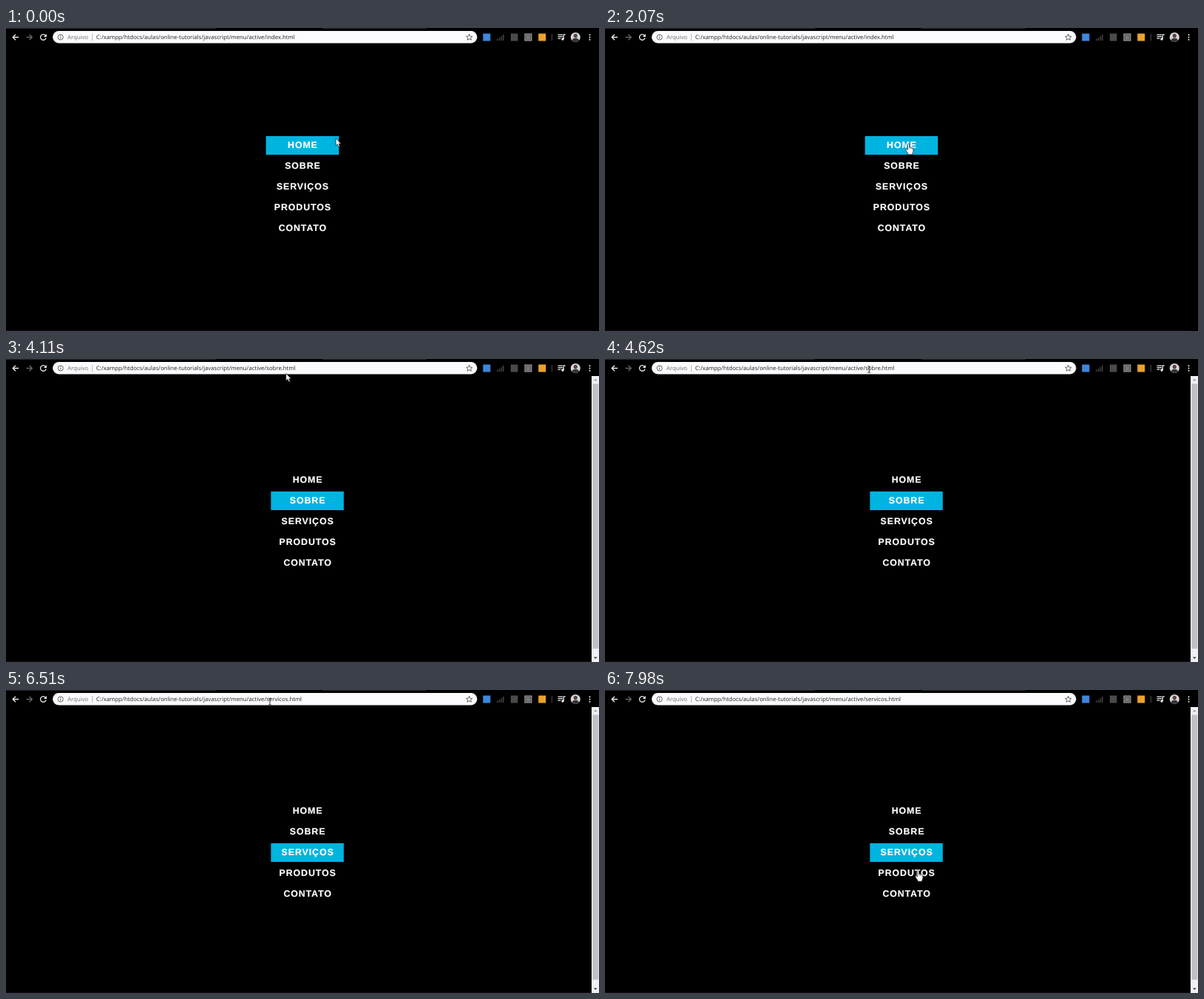
Recreate the animation shown at these times as an HTML page. Size 800 px wide and 409 px high, loop 8000 ms.

```html
<!DOCTYPE html>
<html lang="pt">
<head>
<meta charset="utf-8">
<title>Menu</title>
<style>
  html, body { margin: 0; height: 100%; overflow: hidden; background: #000; }
  svg { display: block; width: 100vw; height: 100vh; }
  text { text-rendering: geometricPrecision; }
  .url { font: 7.75px "Open Sans", "Noto Sans", sans-serif; fill: #202124; }
  .menu text {
    font: bold 12.3px "Liberation Sans", Arial, sans-serif;
    letter-spacing: .95px; text-anchor: middle;
    fill: #fff; stroke: #fff; stroke-width: .2;
  }
  .line { fill: none; stroke: #eee; stroke-width: 1.3; }
  .cursor { fill: #fff; stroke: #222; stroke-width: .7; stroke-linejoin: round; }
</style>
</head>
<body>
<svg viewBox="0 0 800 409" preserveAspectRatio="none">
  <rect width="800" height="409"/>
  <path d="M0 .5H283M427 .5H567" stroke="#29262b"/>
  <path d="M0 408.5H790" stroke="#160916"/>

  <!-- toolbar -->
  <path class="line" d="M17 12.5H9.5M13 8.7 9.2 12.5 13 16.3"/>
  <path class="line" style="stroke:#666" d="M27.5 12.5H35M31.5 8.7 35.3 12.5 31.5 16.3"/>
  <g id="reload">
    <path class="line" d="M53.2 10A3.8 3.8 0 1 0 54 13.3"/>
    <path fill="#eee" d="M54.8 8V12H50.8Z"/>
  </g>
  <path id="stop" class="line" d="M47 9.2 53.6 15.8M53.6 9.2 47 15.8"/>
  <rect x="63" y="4" width="572.6" height="16.4" rx="8.2" fill="#fbfafc"/>
  <g fill="none" stroke="#55585c" stroke-width=".9">
    <circle cx="73.6" cy="12.4" r="3.6"/>
    <path d="M73.6 11.8V14.5M73.6 10.1V11"/>
    <path d="M625 8.3 626.2 11.1 629.2 11.4 626.9 13.3 627.6 16.2 625 14.7 622.4 16.2 623.1 13.3 620.8 11.4 623.8 11.1Z"/>
  </g>
  <text class="url" x="83" y="15" style="fill:#6b6e73">Arquivo</text>
  <path d="M116.4 8V17" stroke="#a5a5aa" stroke-width=".8"/>
  <text class="url" id="url" x="121.7" y="15"></text>

  <rect x="643.5" y="7.5" width="10" height="10" fill="#3f86dc"/>
  <path d="M663 17V14.5M665.7 17V13M668.4 17V11M671 17V8.8" stroke="#3c3c3c" stroke-width="1.7"/>
  <rect x="681" y="7.5" width="9.5" height="10" fill="#4a4a4a"/>
  <rect x="700" y="8" width="9" height="9" fill="#555" stroke="#aaa"/>
  <path d="M702 10.7H707M702 12.6H707M702 14.5H707" stroke="#aaa" stroke-width=".8"/>
  <rect x="718.3" y="7.5" width="10" height="10" fill="#eba32c"/>
  <path d="M736.5 8V17" stroke="#4a4a4a"/>
  <path class="line" d="M744.5 9.2H751M744.5 11.7H751M744.5 14.2H748.3M752.3 15V8.9H754.8"/>
  <circle cx="751" cy="15" r="1.7" fill="#eee"/>
  <clipPath id="round"><circle cx="768.3" cy="12.4" r="6.5"/></clipPath>
  <g clip-path="url(#round)">
    <rect x="761" y="5" width="15" height="15" fill="#d8d5d6"/>
    <circle cx="768.3" cy="10.4" r="2.6" fill="#5a4640"/>
    <ellipse cx="768.3" cy="18" rx="5" ry="4.5" fill="#35343a"/>
  </g>
  <g fill="#eee">
    <circle cx="787.5" cy="9.2" r="1"/><circle cx="787.5" cy="12.5" r="1"/><circle cx="787.5" cy="15.8" r="1"/>
  </g>

  <!-- page -->
  <g class="menu" id="menu"><rect id="active" x="350.7" width="98.3" height="25.2" fill="#00b4e0"/></g>
  <g id="scrollbar">
    <rect x="790" y="23" width="10" height="386" fill="#f1f0f2"/>
    <rect x="791.3" y="33.5" width="8" height="357.5" fill="#c1c0c2"/>
    <path d="M793 29.3 795.3 26.6 797.6 29.3Z" fill="#999"/>
    <path d="M793 402.2 795.3 404.9 797.6 402.2Z" fill="#444"/>
  </g>

  <!-- pointers, hot spot at 0,0 -->
  <path class="cursor" id="arrow" d="M0 0V9.8L2.2 7.8 3.8 11.2 5.4 10.5 3.9 7.2H6.9Z"/>
  <g class="cursor" id="hand">
    <path d="M-1.1 .7Q0-.7 1.1 .7V5Q2.3 4.4 3 5.3 4.1 4.8 4.7 5.8 6.2 5.6 6.3 7V10.5Q6.1 12 5.3 13V14.8H-.6V13.4Q-2.6 11-3.7 8.6-4.1 7.2-2.9 7.1-2 7.2-1.1 8.6Z"/>
    <path d="M1.1 5V7.4M3 5.4V7.5M4.7 5.9V7.7" fill="none" stroke-width=".5"/>
  </g>
  <path id="beam" fill="none" stroke="#222" stroke-width=".9" d="M-1.8-4.3Q0-4.3 0-3.4 0-4.3 1.8-4.3M0-3.6V3.8M-1.8 4.5Q0 4.5 0 3.6 0 4.5 1.8 4.5"/>
</svg>

<script>
const LOOP = 8000, TOP = 145.9, STEP = 28;
const items = ['HOME', 'SOBRE', 'SERVIÇOS', 'PRODUTOS', 'CONTATO'];
const pages = [
  { from: 0, file: 'index' },
  { from: 3240, file: 'sobre' },
  { from: 5700, file: 'servicos' }
];
// time, x, y of the pointer
const path = [
  [0, 445, 149], [510, 388, 14], [720, 388, 14], [1080, 352, 14],
  [1530, 384, 15], [2070, 409.5, 156], [2310, 412, 160], [3060, 411, 187.3],
  [3480, 411, 187.3], [4110, 377.8, 19.5], [4350, 386, 13], [4600, 356, 14],
  [4860, 372, 15], [5220, 394.5, 189.5], [5640, 403, 216], [5880, 403, 216],
  [6510, 356, 15.5], [6900, 394, 14], [7260, 372, 16], [7440, 370, 238],
  [7650, 370, 238], [7980, 422.5, 243.5], [LOOP, 422.5, 243.5]
];
const $ = id => document.getElementById(id);
const show = (id, on) => $(id).style.display = on ? '' : 'none';

items.forEach((name, i) => {
  const label = document.createElementNS('http://www.w3.org/2000/svg', 'text');
  label.setAttribute('x', 400.4);
  label.setAttribute('y', TOP + 16.4 + i * STEP);
  label.textContent = name;
  $('menu').append(label);
});

function pointerAt(t) {
  const i = path.findIndex(k => k[0] > t);
  const [t0, x0, y0] = path[i - 1], [t1, x1, y1] = path[i];
  const p = (t - t0) / (t1 - t0), e = p * p * (3 - 2 * p);
  return [x0 + (x1 - x0) * e, y0 + (y1 - y0) * e];
}

function pointerKind(x, y, dx, dy) {
  if (y < 19) return 'beam';
  const row = y - TOP - dy;
  const onLink = Math.abs(x - 400 - dx) < 44 && row >= 0 && row < items.length * STEP && row % STEP < 25;
  return onLink ? 'hand' : 'arrow';
}

let shown = -1;
function showPage(n) {
  if (n === shown) return;
  shown = n;
  $('url').textContent = `C:/xampp/htdocs/aulas/online-tutorials/javascript/menu/active/${pages[n].file}.html`;
  $('active').setAttribute('y', TOP + n * STEP);
  $('menu').setAttribute('transform', n ? 'translate(6.7 4.9)' : '');
  show('scrollbar', n > 0);
}

function draw() {
  const t = performance.now() % LOOP;
  const n = pages.filter(p => t >= p.from).length - 1;
  showPage(n);

  const loading = n > 0 && t - pages[n].from < 90;
  show('stop', loading);
  show('reload', !loading);

  const [x, y] = pointerAt(t);
  const kind = pointerKind(x, y, n ? 6.7 : 0, n ? 4.9 : 0);
  for (const id of ['arrow', 'hand', 'beam']) show(id, id === kind);
  $(kind).setAttribute('transform', `translate(${x} ${y})`);
  requestAnimationFrame(draw);
}
draw();
</script>
</body>
</html>
```
